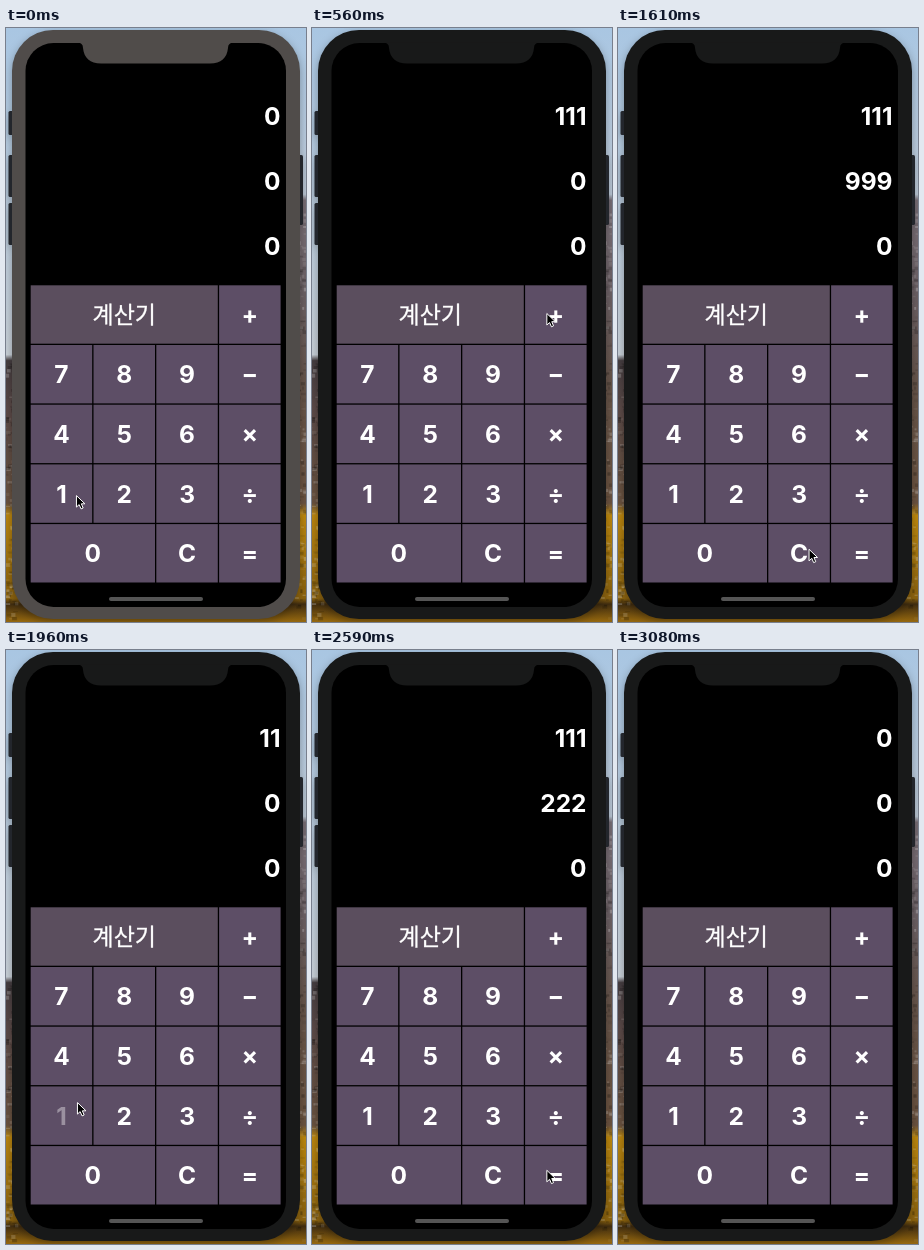
Animation, 300 px wide and 594 px high, one loop 3.15 s. Source, as an HTML page:

```html
<!DOCTYPE html>
<html lang="ko">
<head>
<meta charset="utf-8">
<style>
  html, body { margin: 0; width: 100%; height: 100%; overflow: hidden; background: #000; }
  svg { display: block; width: 100%; height: 100%; }
  text { fill: #fff; font: 700 24.5px Inter, sans-serif; text-anchor: middle; }
  .title { font: 500 23px "Noto Sans CJK KR", "Noto Sans CJK", sans-serif; stroke: #fff; stroke-width: .3; }
  .number { text-anchor: end; }
  .phone { filter: drop-shadow(0 3px 4px rgba(0, 0, 0, .3)); }
</style>
</head>
<body>
<svg viewBox="0 0 300 594">
  <defs>
    <linearGradient id="leftView" x2="0" y2="1">
      <stop offset="0" stop-color="#a9c6e2"/>
      <stop offset=".55" stop-color="#c6ced6"/>
      <stop offset=".56" stop-color="#453d40"/>
      <stop offset=".64" stop-color="#5b4a48"/>
      <stop offset=".8" stop-color="#69523f"/>
      <stop offset=".82" stop-color="#b9850f"/>
      <stop offset=".96" stop-color="#8a620f"/>
      <stop offset=".97" stop-color="#3f2c10"/>
      <stop offset="1" stop-color="#97690f"/>
    </linearGradient>
    <linearGradient id="rightView" x2="0" y2="1">
      <stop offset="0" stop-color="#a9c6e2"/>
      <stop offset=".28" stop-color="#bfccda"/>
      <stop offset=".29" stop-color="#7b7179"/>
      <stop offset=".45" stop-color="#6b6064"/>
      <stop offset=".6" stop-color="#665449"/>
      <stop offset=".8" stop-color="#6b5340"/>
      <stop offset=".82" stop-color="#bd880e"/>
      <stop offset=".96" stop-color="#8a620f"/>
      <stop offset=".97" stop-color="#3f2c10"/>
      <stop offset="1" stop-color="#97690f"/>
    </linearGradient>
  </defs>
  <rect width="150" height="594" fill="url(#leftView)"/>
  <rect x="150" width="150" height="594" fill="url(#rightView)"/>
  <g id="rocks"></g>
  <g class="phone">
    <g fill="#23262c">
      <rect x="2.5" y="83" width="6" height="24" rx="1.5"/>
      <rect x="2.5" y="127" width="6" height="42" rx="1.5"/>
      <rect x="2.5" y="175" width="6" height="42" rx="1.5"/>
      <rect x="291" y="127" width="6" height="70" rx="1.5"/>
    </g>
    <rect id="bezel" x="6" y="2" width="288" height="589" rx="41"/>
  </g>
  <rect x="19.5" y="15" width="260.5" height="564" rx="28"/>
  <path id="notch" d="M71 14.5Q77 14.5 77 20C78 30 84 35.5 95 35.5H204C215 35.5 221 30 222 20Q222 14.5 228 14.5Z"/>
  <rect x="103" y="569" width="94" height="4" rx="2" fill="#555"/>
  <g id="keys"></g>
  <g id="numbers"></g>
  <path id="cursor" d="M0 0V11.5L2.7 9 4.6 13.3 6.7 12.4 4.9 8.2H8.5Z" fill="#000" stroke="#fff" stroke-linejoin="round"/>
</svg>
<script>
const LOOP = 3150, STEP = 70;
const $ = id => document.getElementById(id);

function add(parent, tag, attributes, label = '') {
  const node = document.createElementNS('http://www.w3.org/2000/svg', tag);
  for (const name in attributes) node.setAttribute(name, attributes[name]);
  node.textContent = label;
  parent.append(node);
  return node;
}

// Rough texture on the hills at both sides
let seed = 7;
const random = () => (seed = seed * 16807 % 2147483647) / 2147483647;
for (let i = 0; i < 320; i++) {
  const left = i % 2, top = left ? 335 : 175;
  add($('rocks'), 'rect', {
    x: (left ? -1 : 288) + random() * 10, y: top + random() * (594 - top),
    width: 2 + random() * 3, height: 1 + random() * 3,
    fill: random() < .6 ? '#000' : '#fff', opacity: random() * .25
  });
}

const layout = ['계계계+', '789−', '456×', '123÷', '00C='];
const PITCH_X = 62.8, PITCH_Y = 59.7, GAP = 1.3;
const keys = {};
layout.forEach((row, r) => {
  for (const name of new Set(row)) {
    const span = row.split(name).length - 1, isTitle = span === 3;
    const x = 24.7 + row.indexOf(name) * PITCH_X, y = 257.3 + r * PITCH_Y;
    const width = span * PITCH_X - GAP, height = PITCH_Y - GAP;
    const cx = x + width / 2, cy = y + height / 2;
    add($('keys'), 'rect', { x, y, width, height, fill: isTitle ? '#5b4e5e' : '#5d4e66' });
    const text = add($('keys'), 'text',
      { x: cx, y: cy + (isTitle ? 8 : 9), class: isTitle ? 'title' : '' }, isTitle ? '계산기' : name);
    keys[name] = { cx, cy, text };
  }
});
const numbers = [0, 1, 2].map(i => add($('numbers'), 'text', { x: 274.5, y: 96.5 + i * 65, class: 'number' }));

// The pointer's stops: key, taps, first tap time, time between taps, offset from the key's centre
const stops = [
  ['1', 3, 140, 140, 15, 2], ['+', 1, 630, 0, -9, -1],
  ['9', 3, 980, 140, -18, 2], ['C', 0, 1680, 0, 10, -4], ['=', 1, 1820, 0, -9, -5],
  ['1', 3, 1918, 42, 16, -13], ['−', 1, 2170, 0, -9, -1],
  ['2', 3, 2310, 70, 5, 0], ['=', 1, 2660, 0, -9, -5], ['C', 1, 2870, 0, 10, -4]
].map(([name, count, start, gap, dx, dy]) => {
  const taps = Array.from({ length: count }, (_, i) => start + i * gap);
  return {
    name, taps, arrive: start - STEP, leave: taps.at(-1) ?? start,
    x: keys[name].cx + dx, y: keys[name].cy + dy
  };
});
const taps = stops.flatMap(stop => stop.taps.map(time => ({ name: stop.name, time })));

// Replays the taps so far: two operands and their result
function calculate(time) {
  let values = [0, 0, 0], operator = '', done = false;
  const reset = () => { values = [0, 0, 0]; operator = ''; done = false; };
  for (const { name } of taps.filter(tap => tap.time <= time)) {
    if (name === 'C') reset();
    else if (name === '=') {
      values[2] = operator === '+' ? values[0] + values[1] : values[0] - values[1];
      done = true;
    } else if (/\d/.test(name)) {
      if (done) reset();
      const slot = operator ? 1 : 0;
      values[slot] = values[slot] * 10 + Number(name);
    } else operator = name;
  }
  return values;
}

function pointerAt(time) {
  const next = stops.findIndex(stop => stop.leave >= time);
  if (next < 0) return null;
  const to = stops[next], from = stops[next - 1] ?? to;
  const u = Math.min(1, Math.max(0, (time - from.leave) / (to.arrive - from.leave)));
  const eased = u * u * (3 - 2 * u);
  return [from.x + (to.x - from.x) * eased, from.y + (to.y - from.y) * eased];
}

function draw(time) {
  const bezelColor = time < STEP ? '#504c4a' : '#181919';
  $('bezel').setAttribute('fill', bezelColor);
  $('notch').setAttribute('fill', bezelColor);

  calculate(time).forEach((value, i) => numbers[i].textContent = value);

  for (const name in keys) {
    const pressed = taps.some(tap => tap.name === name && time >= tap.time && time < tap.time + STEP);
    keys[name].text.style.opacity = pressed ? .38 : 1;
  }

  const point = pointerAt(time);
  $('cursor').style.display = point ? '' : 'none';
  if (point) $('cursor').setAttribute('transform', `translate(${point})`);
}

const begin = performance.now();
function tick() {
  const elapsed = (performance.now() - begin) % LOOP;
  draw(Math.floor(elapsed / STEP) * STEP);
  requestAnimationFrame(tick);
}
tick();
</script>
</body>
</html>
```
